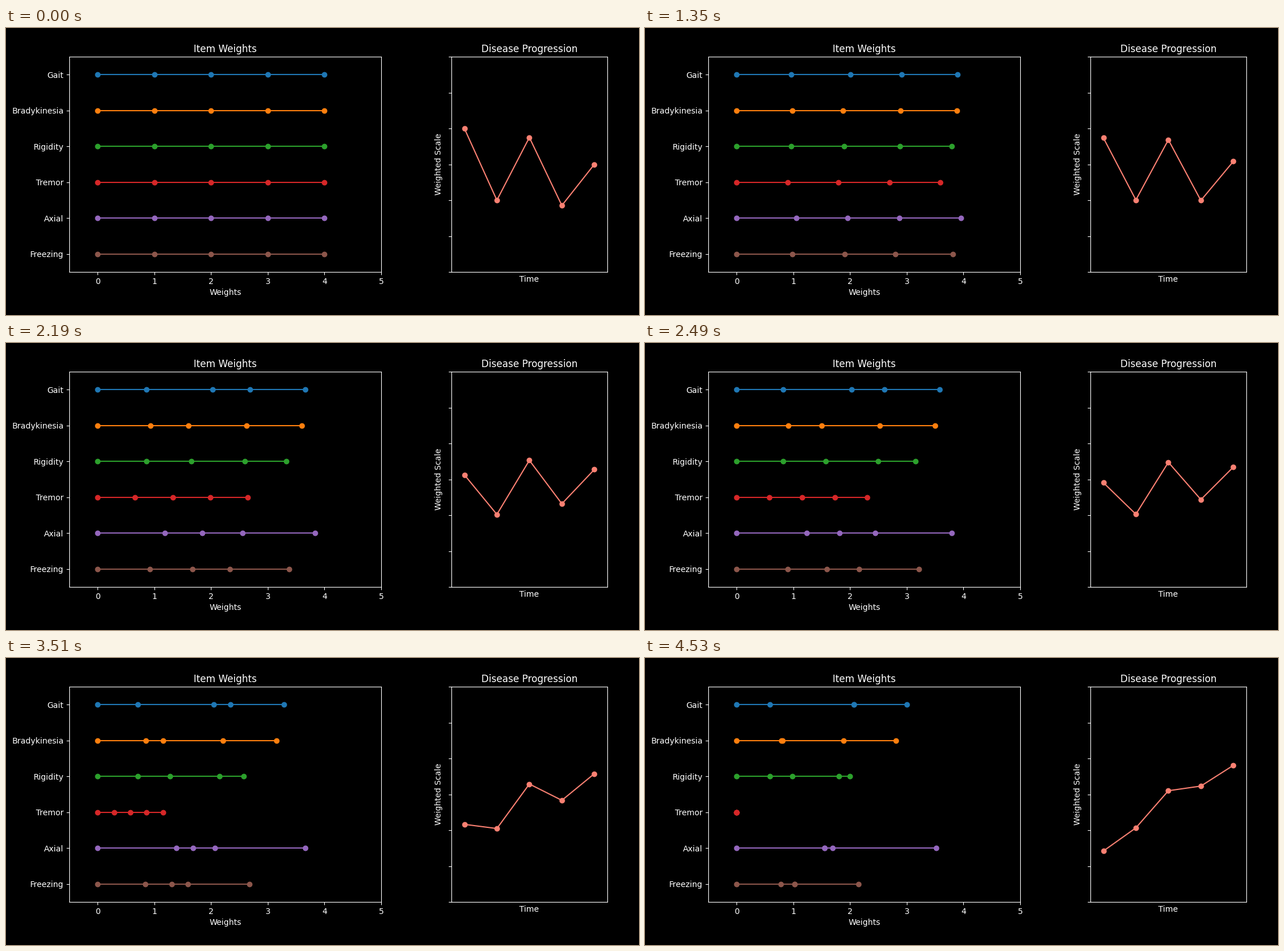
Write a matplotlib script that moves like this. It is 1100x500 px and loops after 6570 ms.

```python
import numpy as np
import matplotlib.pyplot as plt
from matplotlib.animation import FuncAnimation

INTERVAL = 30   # ms
FRAMES = 219
HOLD = 35       # ticks before the motion begins
STEPS = 59      # moves, one every second tick

# Final weight of each score level
ITEMS = {
    "Freezing": [0, 0.776, 1.023, 1.023, 2.147],
    "Axial": [0, 1.548, 1.548, 1.69, 3.518],
    "Tremor": [0, 0, 0, 0, 0],
    "Rigidity": [0, 0.585, 0.981, 1.808, 2.0],
    "Bradykinesia": [0, 0.788, 0.812, 1.887, 2.81],
    "Gait": [0, 0.585, 2.068, 2.068, 3.0],
}
COLORS = ["tab:brown", "tab:purple", "tab:red", "tab:green", "tab:orange", "tab:blue"]

levels = np.arange(5)
weights = np.array(list(ITEMS.values()))
scale_start = np.array([16, 8, 15, 7.41, 12])
scale_end = np.array([5.68, 8.26, 12.4, 12.92, 15.23])

plt.style.use("dark_background")
fig, (ax_w, ax_p) = plt.subplots(
    1, 2, figsize=(11, 5), dpi=100,
    gridspec_kw=dict(width_ratios=[2, 1], left=0.1, right=0.95,
                     bottom=0.15, top=0.9, wspace=0.3))

ax_w.set(title="Item Weights", xlabel="Weights", xlim=(-0.5, 5), ylim=(-0.5, 5.5))
ax_w.set_xticks(range(6))
ax_w.set_yticks(range(6), labels=list(ITEMS))
rows = [ax_w.plot(levels, np.full(5, y), "o-", color=c)[0]
        for y, c in enumerate(COLORS)]

ax_p.set(title="Disease Progression", xlabel="Time", ylabel="Weighted Scale",
         xlim=(-0.4, 4.4), ylim=(0, 24))
ax_p.set_xticks([])
ax_p.set_yticks(range(0, 25, 4), labels=[""] * 7)
curve, = ax_p.plot(levels, scale_start, "o-", color="salmon")


def mix(a, b, t):
    return a + (b - a) * t


def update(i):
    t = np.clip((i - HOLD) // 2 + 1, 0, STEPS) / STEPS
    for row, target in zip(rows, weights):
        row.set_xdata(mix(levels, target, t))
    curve.set_ydata(mix(scale_start, scale_end, t))
    return [*rows, curve]


anim = FuncAnimation(fig, update, frames=FRAMES, interval=INTERVAL,
                     repeat=True, repeat_delay=0)
plt.show()
```
